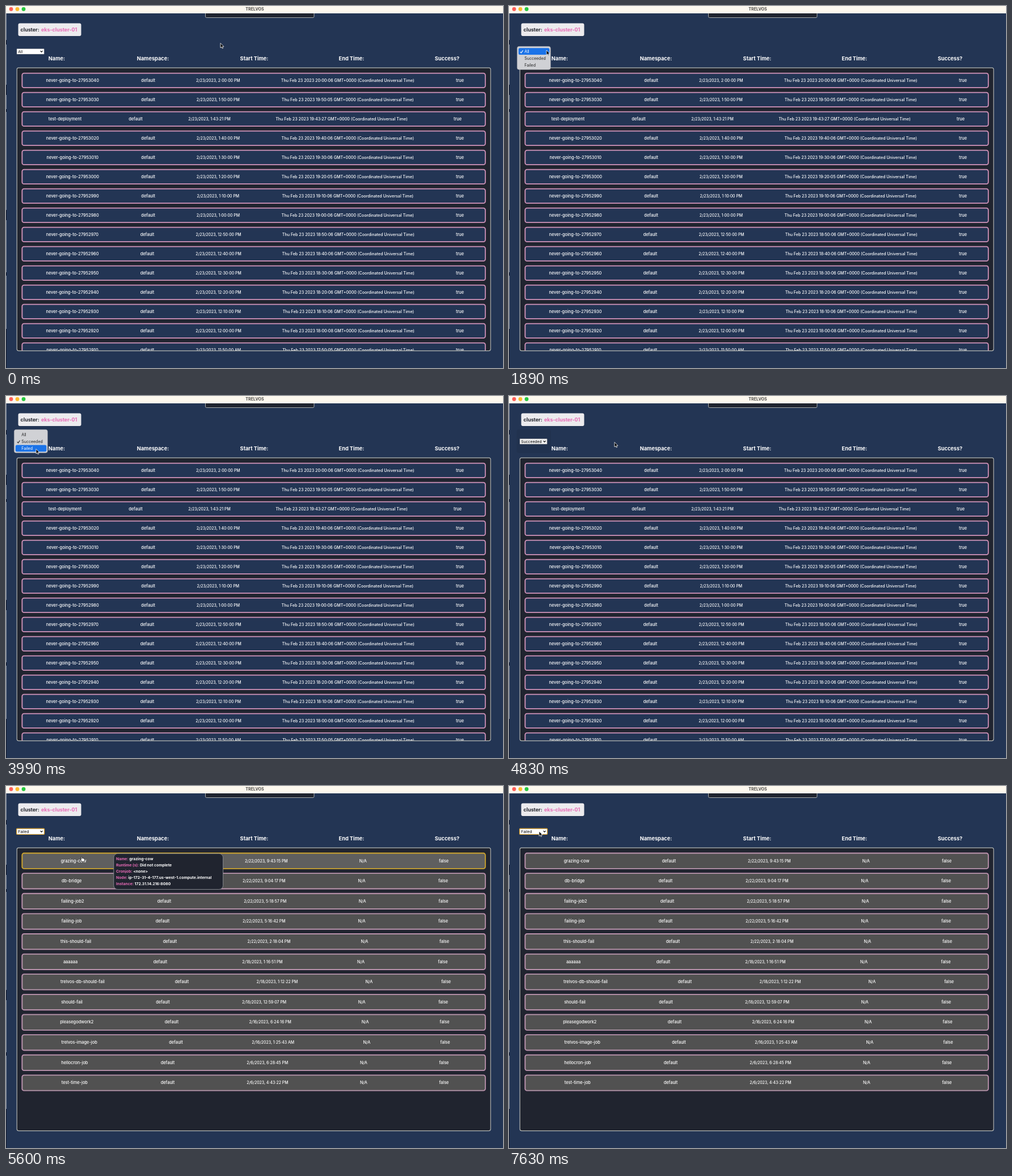
Recreate the animation shown at these times as an HTML page. Size 876 by 639 pixels, loop 8 s.

```html
<!DOCTYPE html>
<html lang="en">
<head>
<meta charset="utf-8">
<title>Job list</title>
<style>
  html, body { margin: 0; width: 100%; height: 100%; overflow: hidden; background: #233554; }
  svg { display: block; width: 876px; height: 639px; font-family: Inter, "Open Sans", sans-serif; }
  text { white-space: pre; }
</style>
</head>
<body>
<svg id="stage" viewBox="0 0 876 639"></svg>
<script>
const LOOP = 8000, STEP = 70;
const NAVY = '#233554', DARK = '#20242f', PINK = '#e56ab5';
const stage = document.getElementById('stage');

function el(parent, tag, attrs = {}, content) {
  const node = document.createElementNS('http://www.w3.org/2000/svg', tag);
  for (const k in attrs) node.setAttribute(k, attrs[k]);
  if (content !== undefined) node.textContent = content;
  parent.append(node);
  return node;
}
const group = (parent, attrs) => el(parent, 'g', attrs);
const rect = (parent, x, y, width, height, rx, fill, more) =>
  el(parent, 'rect', { x, y, width, height, rx, fill, ...more });
const label = (parent, x, y, str, size, weight, fill, anchor = 'start') =>
  el(parent, 'text', { x, y, fill, 'font-size': size, 'font-weight': weight, 'text-anchor': anchor }, str);
const show = (node, on) => node.setAttribute('visibility', on ? 'visible' : 'hidden');

// Window chrome and page header
rect(stage, 0, 0, 876, 639, 0, NAVY);
rect(stage, 0, 13, 1, 626, 0, '#8992a3');
for (const [y, h] of [[60, 8], [139, 18], [182, 5], [360, 18], [470, 6], [570, 69]])
  rect(stage, 0, y, 1, h, 0, '#10182a');
rect(stage, 351.5, 4, 191.5, 16.5, 2, DARK, { stroke: '#a9acac' });
rect(stage, 0, 0, 876, 13, 0, '#fdf8ee');
['#fe5f57', '#febc2e', '#28c840'].forEach((fill, i) =>
  el(stage, 'circle', { cx: 9 + 11 * i, cy: 5.5, r: 3.4, fill }));
label(stage, 438.5, 8, 'TRELVOS', 7.1, 700, '#4a4845', 'middle');
rect(stage, 21.5, 30.5, 111, 22.5, 3, '#ecebee');
label(stage, 25.5, 45, 'cluster:', 8.9, 700, '#23252e');
label(stage, 62, 45, 'eks-cluster-01', 8.9, 700, PINK);
[['Name:', 89.5], ['Namespace:', 259], ['Start Time:', 437.5], ['End Time:', 609], ['Success?', 777.5]]
  .forEach(([s, x]) => label(stage, x, 96, s, 9.2, 700, '#fff', 'middle'));
rect(stage, 19.2, 109.2, 835, 499.4, 3, DARK, { stroke: '#b3b6b3', 'stroke-width': 1.2 });

// Job rows
const clip = el(el(stage, 'defs'), 'clipPath', { id: 'panel' });
rect(clip, 20, 110, 834, 498, 2, '#fff');
const SIZES = [7.4, 7.4, 6.9, 7.15, 7.4];

function jobRow(parent, y, h, fill, cells, xs, edge) {
  const outer = rect(parent, 28.3, y, 816.6, h, 3.5, fill, { stroke: '#c585ae', 'stroke-width': 1.8 });
  const inner = rect(parent, 28.8, y + .2, 815.6, h - .4, 3.2, 'none', { stroke: edge, 'stroke-width': .8 });
  cells.forEach((s, i) => label(parent, xs[i], y + h / 2 + 2.3, s, SIZES[i], 500, '#fff', 'middle'));
  return { outer, inner };
}

const two = n => String(n).padStart(2, '0');
const okRows = group(stage, { 'clip-path': 'url(#panel)' });
const failRows = group(stage, { 'clip-path': 'url(#panel)' });
const endSecs = '655665666666685';

for (let i = 0, n = 0; i < 15; i++) {
  const y = 118.6 + 34 * i;
  const finish = s => `Thu Feb 23 2023 ${s} GMT+0000 (Coordinated Universal Time)`;
  if (i === 2) {
    jobRow(okRows, y, 25.6, NAVY,
      ['test-deployment', 'default', '2/23/2023, 1:43:21 PM', finish('19:43:27'), 'true'],
      [104, 228.5, 358.5, 591.5, 796], '#cf9dbd');
    continue;
  }
  const min = 840 - 10 * n, hour = Math.floor(min / 60), mm = two(min % 60);
  const start = `2/23/2023, ${hour % 12 || 12}:${mm}:00 ${hour < 12 ? 'AM' : 'PM'}`;
  const xs = hour > 12 ? [117.3, 250.7, 373.8, 602.3, 800] : [117, 249, 374.5, 603.3, 800];
  jobRow(okRows, y, 25.6, NAVY,
    ['never-going-to-' + (27953040 - 10 * n), 'default', start,
      finish(`${hour + 6}:${mm}:0${endSecs[i]}`), 'true'], xs, '#cf9dbd');
  n++;
}

// Wider names push the later columns to the right
const failed = [
  ['grazing-cow', '2/22/2023, 9:43:15 PM', 282],
  ['db-bridge', '2/22/2023, 9:04:17 PM', 276],
  ['failing-job2', '2/22/2023, 5:18:57 PM', 279],
  ['failing-job', '2/22/2023, 5:16:42 PM', 276],
  ['this-should-fail', '2/22/2023, 2:18:04 PM', 289],
  ['aaaaaa', '2/18/2023, 1:16:51 PM', 272],
  ['trelvos-db-should-fail', '2/18/2023, 1:12:22 PM', 310],
  ['should-fail', '2/18/2023, 12:59:07 PM', 276.5],
  ['pleasegodwork2', '2/16/2023, 6:24:16 PM', 292],
  ['trelvos-image-job', '2/16/2023, 1:25:43 AM', 299.5],
  ['hellocron-job', '2/6/2023, 6:28:45 PM', 285],
  ['test-time-job', '2/6/2023, 4:43:22 PM', 285],
].map(([name, start, x], i) => {
  const d = x - 272;
  return jobRow(failRows, 118.5 + 35.62 * i, 27.4, '#515151',
    [name, 'default', start, 'N/A', 'false'],
    [113.5 + .566 * d, x, 452 + .68 * d, 625.5 + .38 * d, 770 + .15 * d], '#aaa6aa');
});

// Tooltip
const tip = group(stage);
rect(tip, 189.8, 119.3, 192.8, 63.2, 7, DARK, { stroke: '#8d9097', 'stroke-width': .9 });
[['Name: ', 'grazing-cow'], ['Runtime (s): ', 'Did not complete'], ['Cronjob: ', '<none>'],
  ['Node: ', 'ip-172-31-4-177.us-west-1.compute.internal'], ['Instance: ', '172.31.14.216:8080']]
  .forEach(([key, value], i) => {
    const line = label(tip, 194, 130.7 + 10.95 * i, '', 6.8, 700, '#fff');
    el(line, 'tspan', { fill: PINK }, key);
    el(line, 'tspan', {}, value);
  });

// Select box
const OPTIONS = ['All', 'Succeeded', 'Failed'];
rect(stage, 19, 75.5, 48.2, 9.6, .5, '#fff', { stroke: '#777', 'stroke-width': .4 });
const ring = rect(stage, 18.6, 75.1, 49, 10.4, 1.2, 'none', { stroke: '#e3a62c', 'stroke-width': 1.2 });
const picked = label(stage, 21.3, 82.6, '', 6.8, 400, '#000');
el(stage, 'path', { d: 'M60.6 79.2l2 2 2-2', fill: 'none', stroke: '#000', 'stroke-width': 1.1 });

// Popup menu, drawn with its top left corner at 0,0
const shade = rect(stage, 13.5, 0, 60.5, 42, 4, '#000', { opacity: .06 });
const menu = group(stage);
rect(menu, 0, 0, 59, 41, 3.5, '#d0d1d5', { stroke: '#a2a5ad', 'stroke-width': .5 });
const bar = rect(menu, 2.5, 0, 54.5, 11.8, 2.5, '#1b73e8');
const tick = el(menu, 'path', { d: 'M5.5 0l1.7 2 3-4.4', fill: 'none', 'stroke-width': 1.1 });
const items = OPTIONS.map((s, i) => label(menu, 13, 11.6 + 12.1 * i, s, 7, 400, '#222'));

// Pointers
const arrow = el(stage, 'path', {
  d: 'M0 0V8.4L2 6.7 3.3 9.5 4.6 8.9 3.4 6.2H6Z',
  fill: '#000', stroke: '#fff', 'stroke-width': .8, 'stroke-linejoin': 'round' });
const hand = el(stage, 'path', {
  d: 'M1.4 .8Q2.2 0 2.9 .8V3.6Q4 3 4.6 3.9 5.6 3.4 6 4.3 7.2 4 7.2 5.2V7.2L6.2 9.4H2.6L.2 6Q.1 5 1.4 5.6Z',
  fill: '#fff', stroke: '#111', 'stroke-width': .7, 'stroke-linejoin': 'round' });

// Pointer path: time, x, y
const path = [
  [0, 378, 65.5], [70, 378, 65.5], [280, 384, 67], [910, 84, 81], [1260, 66, 78], [1890, 66, 78],
  [2380, 53, 96], [2660, 50, 92], [2800, 50, 92], [3080, 72, 88], [3360, 56, 82.5],
  [3780, 56, 82.5], [3990, 53, 93.5], [4480, 53, 93.5], [4830, 186, 81.5], [5180, 186, 81.5],
  [5670, 128, 126.5], [6720, 128, 126.5], [6790, 128, 127.5], [6860, 128, 127.5],
  [7140, 146, 88], [7210, 146, 88], [7630, 53, 80], [LOOP, 53, 80],
];
const menus = [
  { open: 1400, click: 2730, top: 71.3, checked: 0, choice: 1 },
  { open: 3640, click: 4480, top: 59.3, checked: 1, choice: 2 },
];

function pointerAt(t) {
  const i = path.findIndex(p => p[0] > t);
  const [t0, x0, y0] = path[i - 1], [t1, x1, y1] = path[i];
  const u = (t - t0) / (t1 - t0), e = u * u * (3 - 2 * u);
  return [x0 + (x1 - x0) * e, y0 + (y1 - y0) * e];
}

function drawMenu(t, y) {
  const m = menus.find(m => t >= m.open && t < m.click + 420);
  show(menu, m);
  show(shade, m);
  if (!m) return;
  const since = t - m.click;
  const over = since < 0 ? Math.max(0, Math.min(2, Math.floor((y - m.top - 2.7) / 12.1))) : m.choice;
  const lit = since < 0 || since >= STEP ? over : -1;
  menu.setAttribute('transform', `translate(14.3 ${m.top})`);
  menu.setAttribute('opacity', Math.max(0, Math.min(1, 1 - (since - 70) / 280)));
  shade.setAttribute('y', m.top - .5);
  bar.setAttribute('y', 3 + 12.1 * over);
  bar.setAttribute('opacity', lit < 0 ? 0 : 1);
  items.forEach((item, i) => item.setAttribute('fill', i === lit ? '#fff' : '#222'));
  tick.setAttribute('transform', `translate(0 ${9.5 + 12.1 * m.checked})`);
  tick.setAttribute('stroke', lit === m.checked ? '#fff' : '#222');
}

function draw(now) {
  const t = Math.floor(now % LOOP / STEP + 1e-6) * STEP;
  const [x, y] = pointerAt(t);
  const done = menus.filter(m => t >= m.click + 420).length;
  const failView = done === 2, hover = failView && y > 118;

  picked.textContent = OPTIONS[done];
  show(ring, failView);
  show(okRows, !failView);
  show(failRows, failView);
  show(tip, hover);
  failed[0].outer.setAttribute('fill', hover ? '#5f5f5f' : '#515151');
  failed[0].outer.setAttribute('stroke', hover ? '#c9a02c' : '#c585ae');
  failed[0].inner.setAttribute('stroke', hover ? '#cfa935' : '#aaa6aa');
  drawMenu(t, y);

  show(arrow, !hover);
  show(hand, hover);
  for (const p of [arrow, hand]) p.setAttribute('transform', `translate(${x} ${y})`);
}

const began = performance.now();
function tickFrame() {
  draw(performance.now() - began);
  requestAnimationFrame(tickFrame);
}
tickFrame();
</script>
</body>
</html>
```
